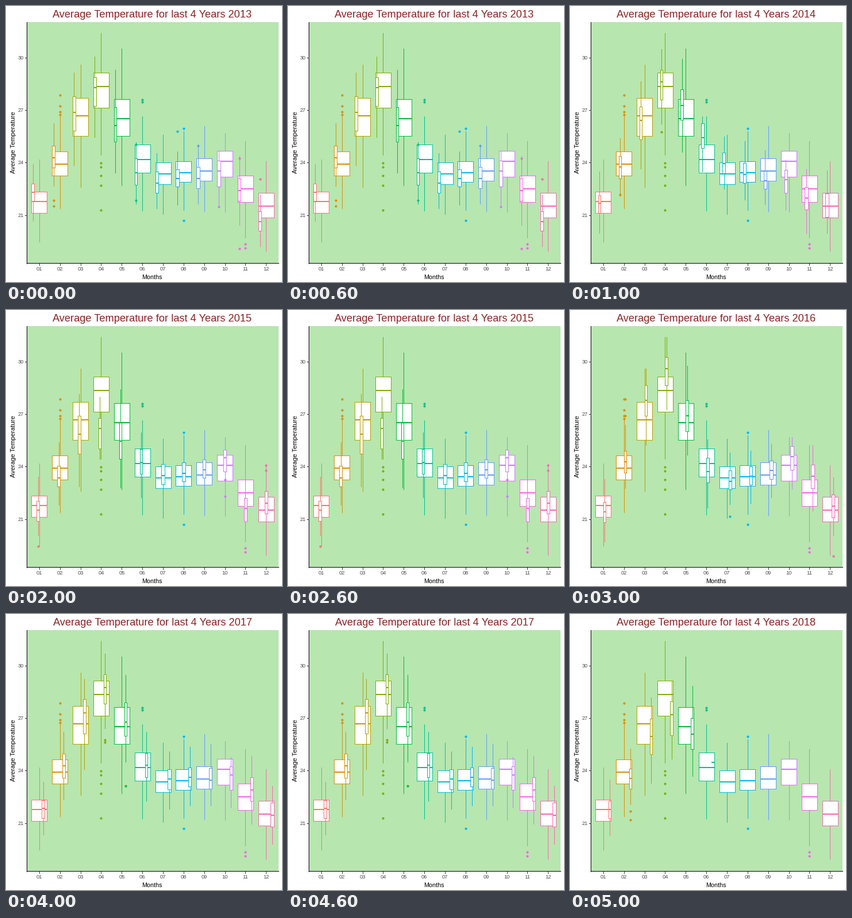
A matplotlib script for the animation above (6000 ms loop, 480 px wide and 480 px high).

```python
import random

import numpy as np
import matplotlib.pyplot as plt
from matplotlib.animation import FuncAnimation
from matplotlib.patches import Rectangle

SIZE = 480
STEP = 35.86          # distance between months
LEFT = 57.9           # centre of the first month
BOX = 0.75 * STEP     # full box width
FIRST, LAST = 2013, 2018
HUES = ["#F8766D", "#DE8C00", "#B79F00", "#7CAE00", "#00BA38", "#00C08B",
        "#00BFC4", "#00B4F0", "#619CFF", "#C77CFF", "#F564E3", "#FF64B0"]

# heights on the stage for all years together, one per month
TOP = [267, 191, 102, 47, 74, 192, 224, 218, 209, 221, 235, 270]
Q3 = [323, 253, 160, 116, 162, 241, 272, 270, 265, 252, 295, 325]
MID = [340, 275, 191, 140, 196, 267, 292, 290, 287, 270, 318, 348]
Q1 = [360, 295, 226, 177, 226, 290, 310, 306, 304, 297, 341, 368]
STRAYS = {2: (155, 174, 184, 189), 4: (273, 280, 295, 312, 355),
          6: (163, 167), 8: (213, 373), 11: (414, 421)}

# how far a year's medians lie below the overall ones, at a few months
KNOTS = (0, 2, 3, 5, 7, 9, 10, 11)
SHIFT = {2013: (-16, -6, 2, 23, 10, 17, 3, 27),
         2014: (3, 8, -8, -38, 3, 32, 16, 0),
         2015: (8, 25, 66, -2, -6, -13, 27, -12),
         2016: (11, -34, -38, 14, -1, -15, -29, -7),
         2017: (-2, -19, -12, -4, -6, 10, -12, 2),
         2018: (0, 22, 35, -9)}
YEAR_STRAYS = {2013: {2: (338, 348), 6: (241, 338), 8: (218,), 9: (243,),
                      10: (349,), 11: (265, 422), 12: (301,)},
               2014: {2: (328,), 4: (219,)},
               2015: {1: (411,), 10: (295, 324), 12: (270, 279)},
               2016: {2: (155, 184), 7: (359,), 12: (428,)},
               2017: {4: (219, 223), 5: (299,)},
               2018: {2: (343, 358)}}

plt.rcParams["font.family"] = "Liberation Sans"
fig = plt.figure(figsize=(SIZE / 72, SIZE / 72), dpi=72, facecolor="white")
ax = fig.add_axes([0, 0, 1, 1])
ax.set_xlim(0, SIZE)
ax.set_ylim(SIZE, 0)
ax.axis("off")


def line(xs, ys, color, width=1, z=2):
    return ax.plot(xs, ys, color=color, lw=width, antialiased=False,
                   solid_capstyle="butt", zorder=z)[0]


def label(x, y, text, size, color="black", ha="center", **kw):
    return ax.text(x, y, text, size=size, color=color, ha=ha,
                   va="baseline", **kw)


def box(x, width, stats, dots, color, z):
    """One box plot; stats run from the top whisker to the bottom one."""
    top, q3, mid, q1, low = (round(s) for s in stats)
    x0, x1, xc = round(x - width / 2), round(x + width / 2), round(x)
    parts = [ax.plot([xc], [y], "o", ms=3.6, mew=0.4, color=color,
                     zorder=z)[0] for y in dots]
    if top < low:
        parts.append(line([xc, xc], [top, q3], color, z=z))
        parts.append(line([xc, xc], [q1, low + 1], color, z=z))
        rect = Rectangle((x0, q3), x1 - x0, q1 - q3, fc="white", ec=color,
                         lw=1, antialiased=False, zorder=z + 0.1)
        parts.append(ax.add_patch(rect))
    parts.append(line([x0, x1 + 1], [mid, mid], color, 2, z + 0.2))
    return parts


def bottom(m):
    return Q1[m] + 1.33 * (Q1[m] - Q3[m])


def year_stats(year, m, rng):
    """A year's box: the overall one, shifted and a little uneven."""
    shift = SHIFT[year]
    mid = MID[m] + np.interp(m, KNOTS[:len(shift)], shift)
    if year == LAST and m == 5:      # a single reading
        return [mid] * 5
    q3 = mid - rng.uniform(0.75, 1.05) * (MID[m] - Q3[m])
    q1 = mid + rng.uniform(0.75, 1.05) * (Q1[m] - MID[m])
    top = max(TOP[m], q3 - rng.uniform(0.5, 0.75) * (Q3[m] - TOP[m]))
    low = min(bottom(m), q1 + rng.uniform(0.45, 0.7) * (bottom(m) - Q1[m]))
    return min(top, q3), q3, mid, q1, max(low, q1)


def year_boxes(year):
    """Narrow boxes of one year, dodged inside the full-width ones."""
    rng = random.Random(year)
    parts = [label(254.5, 20, f"Average Temperature for last 4 Years {year}",
                   18.2, "#8B2323")]
    for m in range(6 if year == LAST else 12):
        slots = 6 if m < 6 else 5    # the last year stops in June
        width = BOX / slots
        x = LEFT + m * STEP + (year - FIRST - (slots - 1) / 2) * width
        dots = YEAR_STRAYS[year].get(m + 1, ())
        parts += box(x, width, year_stats(year, m, rng), dots, HUES[m], 5)
    return parts


# panel, axes and labels
ax.add_patch(Rectangle((37, 28), 437, 419, fc="#B7E6AF", ec="none",
                       zorder=0))
line([36, 36], [28, 448], "black")
line([36, 474], [447, 447], "black")
for m, color in enumerate(HUES):
    x = LEFT + m * STEP
    line([round(x)] * 2, [448, 451], "#333333")
    label(x, 460.5, f"{m + 1:02d}", 9.3, "#4D4D4D")
    stats = TOP[m], Q3[m], MID[m], Q1[m], bottom(m)
    box(x, BOX, stats, STRAYS.get(m + 1, ()), color, 3)
for t in range(21, 31, 3):
    y = round(90 + (30 - t) * 30.4)
    line([33, 36], [y, y], "#333333")
    label(31, y + 3.3, str(t), 9.3, "#4D4D4D", ha="right")
label(254, 475, "Months", 10.8)
label(16, 237.5, "Average Temperature", 11.2, rotation=90,
      rotation_mode="anchor")

years = [year_boxes(y) for y in range(FIRST, LAST + 1)]


def draw(i):
    for k, parts in enumerate(years):
        for part in parts:
            part.set_visible(k == i)
    return []


draw(0)
anim = FuncAnimation(fig, draw, frames=len(years), interval=1000,
                     repeat=True, repeat_delay=0, blit=False)
plt.show()
```
